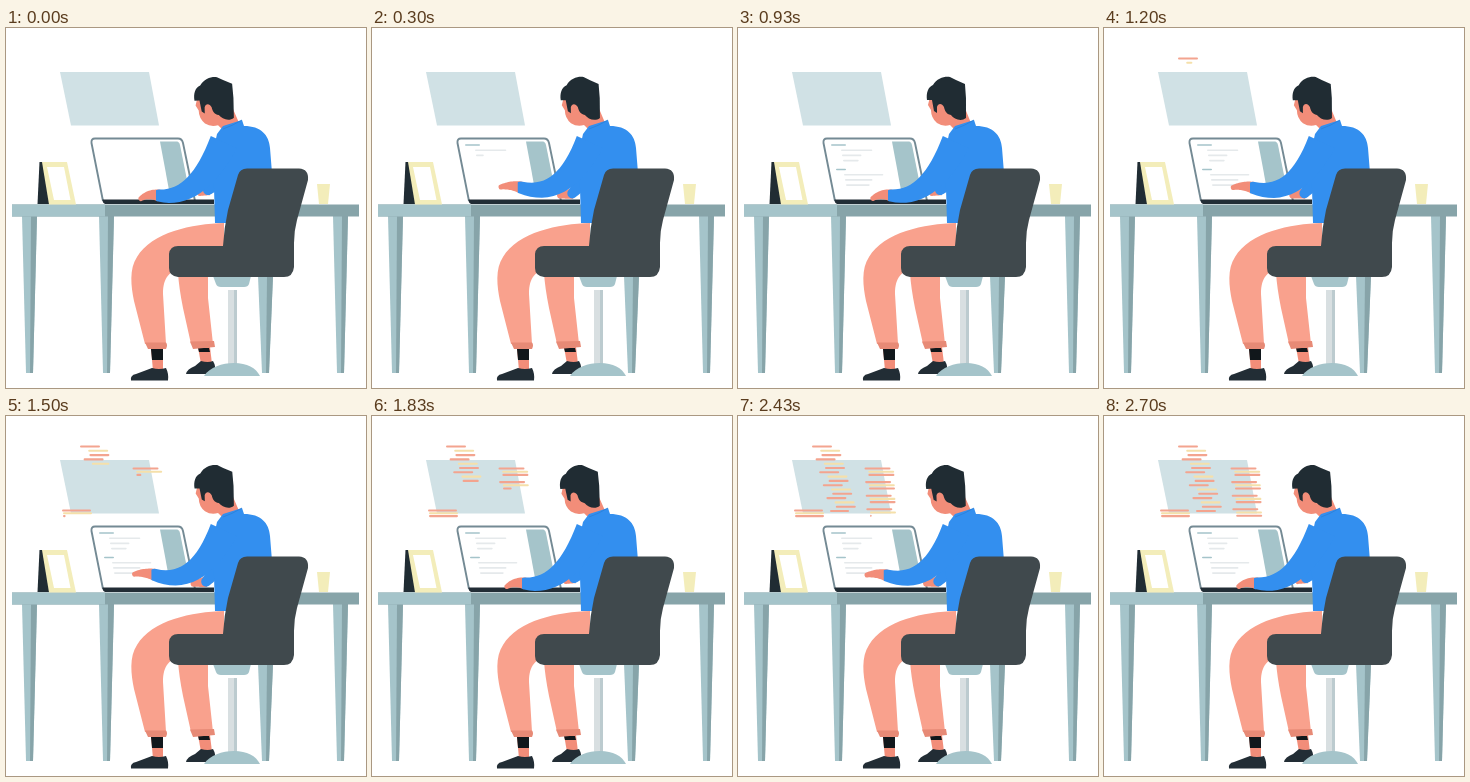
Recreate the animation shown at these times as an HTML page with a canvas. Size 360 by 360 pixels, loop 2730 ms.

```html
<!DOCTYPE html>
<html lang="en">
<head>
<meta charset="utf-8">
<title>Coding at a desk</title>
<style>
html, body { margin: 0; width: 100%; height: 100%; overflow: hidden; background: #fff; }
canvas { display: block; width: 100vmin; height: 100vmin; }
</style>
</head>
<body>
<canvas id="stage"></canvas>
<script>
const ctx = document.getElementById('stage').getContext('2d');
const LOOP = 2730, STEP = 30, TAU = 2 * Math.PI;
const C = {
  skin: '#f28d79', trousers: '#f9a18d', cuff: '#e78a76', blue: '#338fef', hair: '#202c33',
  chair: '#40494d', desk: '#87a4a9', pale: '#a5c4ca', panel: '#d0e1e5', cream: '#f3edba',
  shoe: '#222d35', sock: '#11171b', metal: '#748a94', text: '#e5e9eb',
  salmon: '#f3a48f', sand: '#f5e0aa'
};

const clamp = v => Math.max(0, Math.min(1, v));
const wave = turns => (1 - Math.cos(turns * TAU)) / 2;
const mix = (a, b, k) => a.map((v, i) => v + (b[i] - v) * k);

function shape(d, fill) {
  ctx.fillStyle = fill;
  ctx.fill(new Path2D(d));
}
function line(d, color, width) {
  ctx.strokeStyle = color;
  ctx.lineWidth = width;
  ctx.stroke(new Path2D(d));
}
function bar(x, y, w, h, color) {
  if (w <= 0) return;
  ctx.fillStyle = color;
  ctx.beginPath();
  ctx.roundRect(x, y - h / 2, w, h, Math.min(h, w) / 2);
  ctx.fill();
}

// Tapered limb along a quadratic curve, with a round end.
function limb(from, bend, to, startWidth, endWidth, color) {
  const left = [], right = [];
  for (let k = 0; k <= 1; k += 1 / 16) {
    const a = mix(from, bend, k), b = mix(bend, to, k);
    const [x, y] = mix(a, b, k);
    const dx = b[0] - a[0], dy = b[1] - a[1];
    const r = (startWidth + (endWidth - startWidth) * k) / 2 / Math.hypot(dx, dy);
    left.push([x + dy * r, y - dx * r]);
    right.unshift([x - dy * r, y + dx * r]);
  }
  const angle = Math.atan2(to[1] - bend[1], to[0] - bend[0]);
  ctx.fillStyle = color;
  ctx.beginPath();
  left.forEach(p => ctx.lineTo(...p));
  ctx.arc(...to, endWidth / 2, angle - TAU / 4, angle + TAU / 4);
  right.forEach(p => ctx.lineTo(...p));
  ctx.fill();
}

// Rows come in threes: the first is outdented, the second is light.
function codeBlock({ x, y, rows, pitch, gap = 0, drift = 0, indent, width, start, pace }, t) {
  for (let i = 0; i < rows; i++) {
    const part = i % 3;
    const left = x + drift * i + (part ? indent : 0);
    const top = y + pitch * i + gap * Math.floor(i / 3);
    const grown = clamp((t - start) / pace - i);
    bar(left, top, width * grown, 2.1, part === 1 ? C.sand : C.salmon);
  }
}

function floatingCode(t) {
  codeBlock({ x: 74, y: 30.5, rows: 16, pitch: 4.3, drift: 1.2, indent: 7, width: 20, start: 1090, pace: 84 }, t);
  codeBlock({ x: 126.5, y: 52.5, rows: 12, pitch: 3.2, gap: 4, drift: 0.2, indent: 3.5, width: 26, start: 1270, pace: 105 }, t);
  codeBlock({ x: 56, y: 94.5, rows: 3, pitch: 2.8, indent: 1, width: 29, start: 1270, pace: 110 }, t);
}

function screenCode(t) {
  for (let i = 0; i < 8; i++) {
    const block = i >> 2, row = i % 4;
    const grown = clamp((t - 60) / 100 - i);
    const x = 93 + 5 * block + (row ? 9 - 2 * block + row : 0);
    const width = row ? 22 + 8 * block + 10 * Math.sin(row * 2.2 - 1) : 15 - 5 * block;
    bar(x, 117 + 24.5 * block + 5.2 * row, width * grown, 1.6, row ? C.text : C.pale);
  }
}

function furniture() {
  shape('M54 44H143L153 97.5H65Z', C.panel);
  for (const [x, top] of [[16, 188], [93, 188], [252, 248], [327, 188]]) {
    shape(`M${x} ${top}H${x + 15}L${x + 11} 345H${x + 4}Z`, C.pale);
    shape(`M${x + 9} ${top}H${x + 15}L${x + 11} 345H${x + 8}Z`, C.desk);
  }
  shape('M6 176.5H353V188.5H6Z', C.desk);
  shape('M6 176.5H99V188.5H6Z', C.pale);
  shape('M33.5 134H38L45 176H31.5Z', C.hair);
  shape('M36 134H61L70 176.5H43Z', C.cream);
  shape('M41 139H58L64.5 172H48Z', '#fff');
  shape('M311 156H324L322 176H313Z', C.cream);
}

function laptop(t) {
  const outline = 'M97 173L85.5 115Q85 110.5 89 110.5H172Q176 110.5 177 115L189 173';
  shape(outline, '#fff');
  shape('M154 113.5H171Q173 113.5 174 117L183 162H163Z', C.pale);
  screenCode(t);
  line(outline, C.metal, 1.9);
  shape('M96.5 171.5H208V176H99Q96.5 175 96.5 171.5Z', C.shoe);
}

function legs() {
  shape('M172 245H202V270L207 316H185L177 280Q173 260 172 245Z', C.trousers);
  shape('M192 319H204L206 336H195Z', C.skin);
  shape('M192 320H203L204 324H193Z', C.sock);
  shape('M184 313.5L208 313L209 319L187 321Z', C.cuff);
  shape('M180 346Q181 341 189 338L195 333Q202 335 207 333Q210 338 209 344Q205 346 200 346Z', C.shoe);
  shape('M145 320H157V343H147Z', C.skin);
  shape('M145 321H157V332H146Z', C.sock);
  shape('M218 195C186 196 146 204 131 229C123 241 125 258 128 273L139 316H160L157 266C157 249 164 242 176 242H218Z', C.trousers);
  shape('M139 314.5H160Q162 317 160 321H142Z', C.cuff);
  shape('M125 352.5Q124 347 130 346L146 340Q153 342 160 340Q163 346 162 352.5Z', C.shoe);
}

function head(lean) {
  ctx.save();
  ctx.translate(218, 96);
  ctx.rotate(-0.035 * lean);
  ctx.translate(-218, -96);
  shape('M192 69L190 77L193 82Q193 90 199 95Q205 99 212 97L219 104L233 95L222 68Z', C.skin);
  shape('M189 72C188 65 190 59 195 57C199 50 207 48 212 49L218 52L227 56L228 70V90C223 94 216 91 213 87C208 86 207 83 206 79C204 75 200 75 199 79V85L196 83L194 72Z', C.hair);
  ctx.restore();
}

function body(lift) {
  const farWrist = mix([202, 162], [200, 166], lift);
  const farTip = mix([194, 165], [187, 168], lift);
  limb(farWrist, mix(farWrist, farTip, 0.5), farTip, 11, 6, C.skin);
  limb([212, 148], [208, 158], farWrist, 16, 10, C.blue);
  shape('M211 106L217 98L236 92L238 98C255 98 263 107 264 120L266 145H237L221 195H209L208 160L204 138Z', C.blue);

  const wrist = mix([153, 167.5], [148, 158], lift);
  const tip = mix([135, 170.5], [128, 157], lift);
  const knuckle = mix([143, 165], [138, 155], lift);
  limb(wrist, knuckle, tip, 12, 5, C.skin);
  ctx.save();
  ctx.beginPath();
  ctx.rect(wrist[0] - 3, 90, 120, 100);
  ctx.clip();
  limb([218, 114], [191, 173], wrist, 29, 12, C.blue);
  ctx.restore();
  line('M217 101Q226 98 236 92', '#2a7dd6', 0.7);
}

function chair() {
  shape('M207 248H245L243 256Q242 259 238 259H215Q211 259 210 256Z', C.pale);
  shape('M222 262H231V337H222Z', '#d8dfe1');
  shape('M228 262H231V337H228Z', '#bccbcf');
  shape('M198 348C204 339 216 335 228 335C241 335 250 340 254 348Z', C.pale);
  shape('M232 147Q234 140.5 241 140.5H293Q303 141 302 152L291 192Q288 203 288 215V239Q287 249 278 249H172Q163 248 163 240V226Q164 218 172 218H217Q218 200 222 182Z', C.chair);
}

function draw(t) {
  const lift = clamp(wave(3 * t / LOOP) * 1.15);
  const lean = wave((t - 795) / LOOP);
  ctx.fillStyle = '#fff';
  ctx.fillRect(0, 0, 360, 360);
  furniture();
  floatingCode(t);
  laptop(t);
  legs();
  head(lean);
  body(lift);
  chair();
}

function fit() {
  const size = Math.min(innerWidth, innerHeight) * (devicePixelRatio || 1);
  ctx.canvas.width = ctx.canvas.height = Math.round(size);
  ctx.setTransform(size / 360, 0, 0, size / 360, 0, 0);
}
const origin = performance.now();
function tick() {
  const t = (performance.now() - origin) % LOOP;
  draw(Math.floor(t / STEP) * STEP);
  requestAnimationFrame(tick);
}
addEventListener('resize', fit);
fit();
tick();
</script>
</body>
</html>
```
